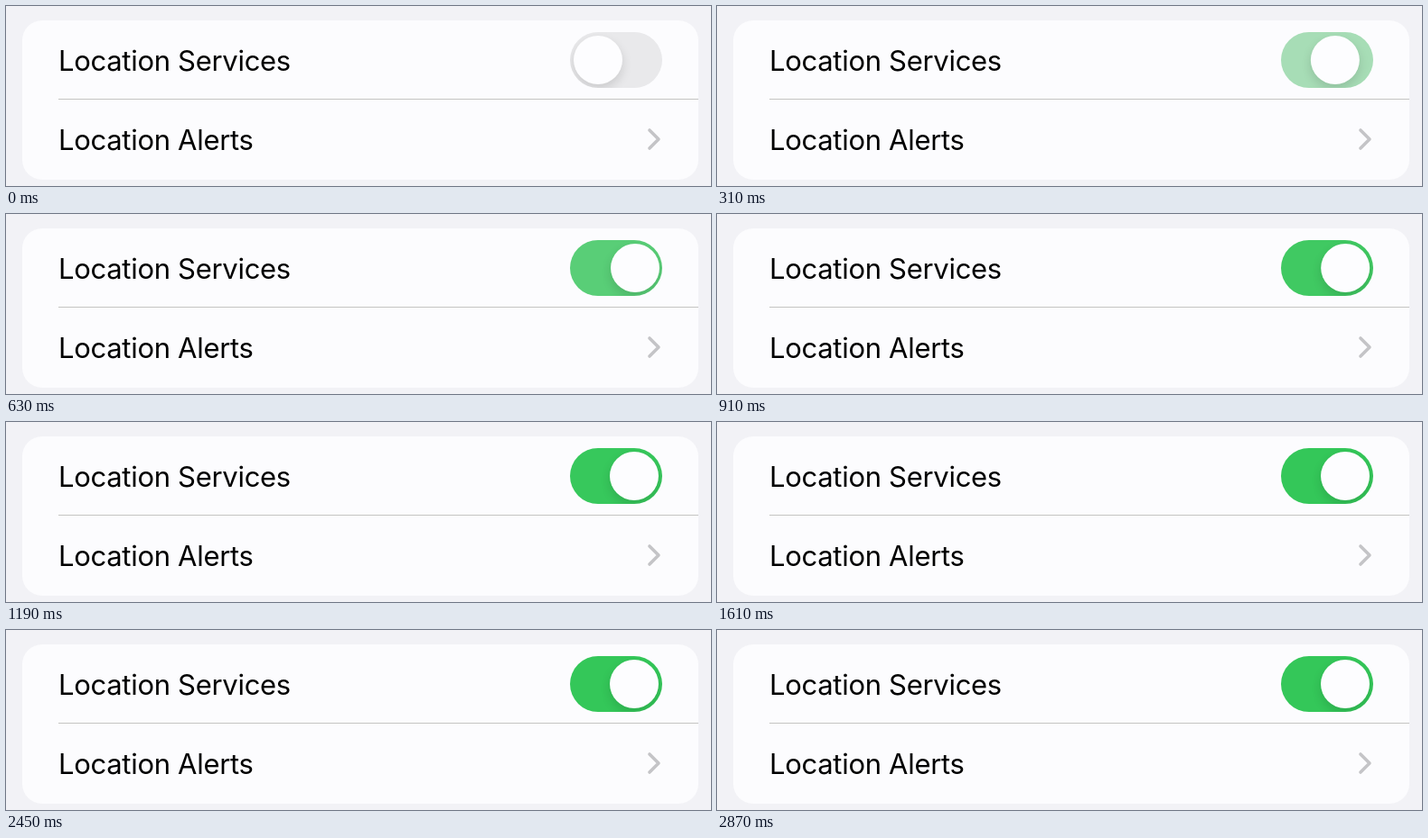
An HTML page for the animation above (3050 ms loop, 780 px wide and 200 px high).

```html
<!DOCTYPE html>
<html lang="en">
<head>
<meta charset="utf-8">
<title>Location settings</title>
<style>
html, body { margin: 0; width: 100%; height: 100%; overflow: hidden; background: #f2f2f6; }
svg { display: block; }
text { font: 400 31px Inter, "Open Sans", sans-serif; letter-spacing: -.3px; }
</style>
</head>
<body>
<svg width="780" height="200" viewBox="0 0 780 200">
  <defs>
    <clipPath id="pill"><rect x="624" y="29" width="102" height="62" rx="31"/></clipPath>
    <filter id="blur" x="-50%" y="-50%" width="200%" height="200%"><feGaussianBlur stdDeviation="6"/></filter>
  </defs>
  <rect x="18" y="16" width="748" height="177" rx="22" fill="#fcfcfe"/>
  <text x="58" y="72">Location Services</text>
  <text x="58" y="160">Location Alerts</text>
  <rect x="58" y="103" width="708" height="1" fill="#c4c4c2"/>
  <path d="M712 138L722 148L712 158" fill="none" stroke="#c4c4c7" stroke-width="3.6" stroke-linecap="round" stroke-linejoin="round"/>
  <g clip-path="url(#pill)">
    <rect id="track" x="624" y="29" width="102" height="62"/>
    <g id="knob">
      <circle cy="65" r="27" opacity=".13" filter="url(#blur)"/>
      <circle cy="60" r="27" fill="#fdfdff"/>
    </g>
  </g>
</svg>
<script>
const LOOP = 3050, START = 70;
const OFF = [233, 233, 235], ON = [52, 199, 89];
const track = document.getElementById('track');
const knob = document.getElementById('knob');

// Underdamped spring with a slight overshoot
function slide(t) {
  const damp = .00659, freq = .00561;
  return 1 - Math.exp(-damp * t) * (Math.cos(freq * t) + damp / freq * Math.sin(freq * t));
}

// Critically damped spring, slower than the knob
function fade(t) {
  const x = t / 190;
  return 1 - (1 + x) * Math.exp(-x);
}

function draw(now) {
  const t = Math.max(0, now % LOOP - START);
  const k = fade(t);
  const rgb = OFF.map((v, i) => Math.round(v + (ON[i] - v) * k));
  track.setAttribute('fill', `rgb(${rgb})`);
  knob.setAttribute('transform', `translate(${(655 + 40 * slide(t)).toFixed(2)})`);
}

const begin = performance.now();
function tick() {
  draw(performance.now() - begin);
  requestAnimationFrame(tick);
}
tick();
</script>
</body>
</html>
```
